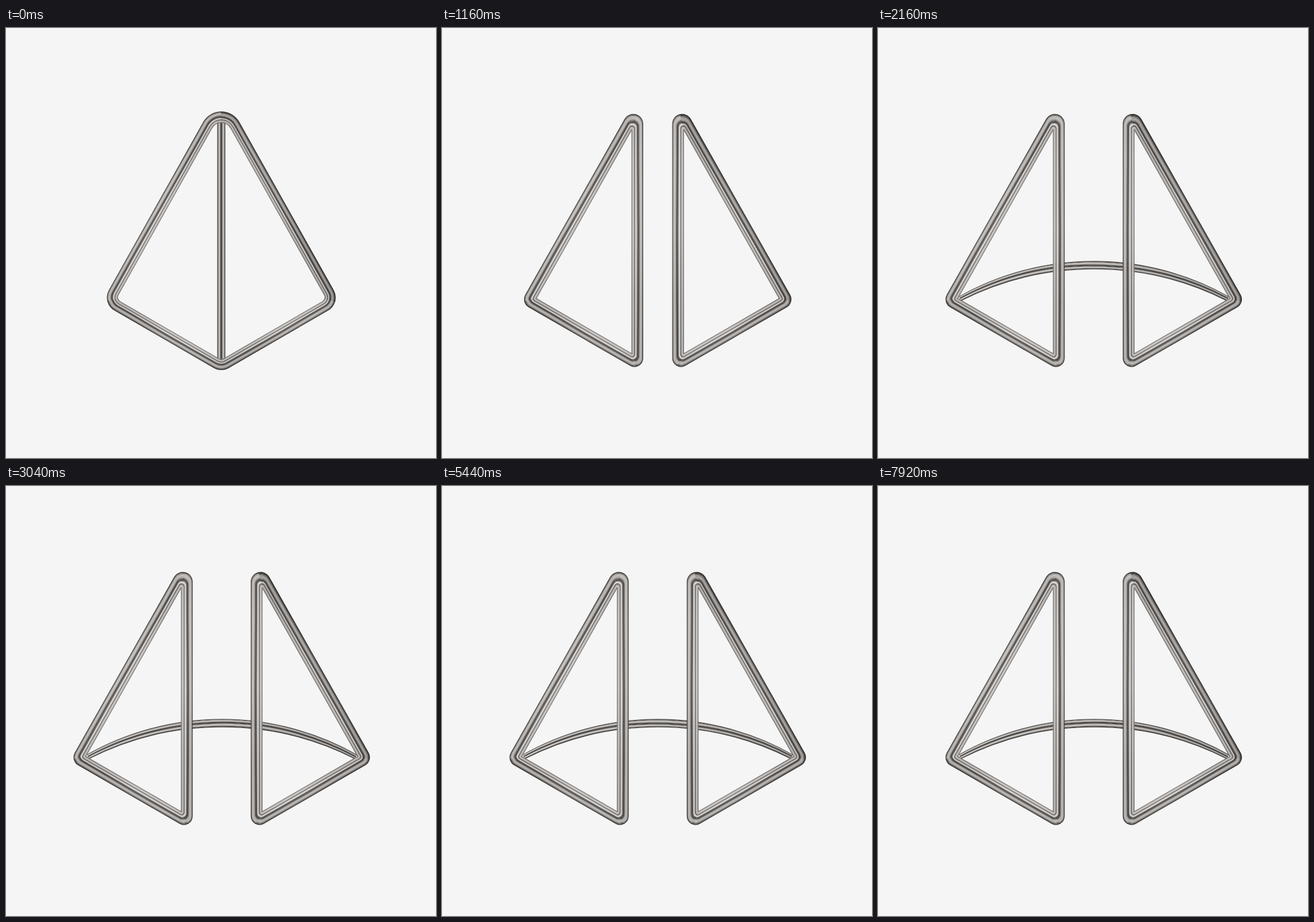
Recreate the animation shown at these times as an HTML page. Size 748x748 px, loop 7960 ms.

```html
<!DOCTYPE html>
<html lang="en">
<head>
<meta charset="utf-8">
<title>Steel frame</title>
<style>
  html, body { margin: 0; width: 100%; height: 100%; overflow: hidden; background: #f5f5f5; }
  svg { display: block; width: 100vw; height: 100vh; }
</style>
</head>
<body>
<svg id="stage" viewBox="0 0 748 748"></svg>
<script>
const LOOP = 7960, STEP = 40, SPLIT = 760, OPEN = 800, ARC_START = 1720;
const NS = 'http://www.w3.org/2000/svg';
const stage = document.getElementById('stage');
let nextId = 0;

function add(parent, tag, attrs = {}) {
  const el = document.createElementNS(NS, tag);
  for (const key in attrs) el.setAttribute(key, attrs[key]);
  return parent.appendChild(el);
}

const defs = add(stage, 'defs');
const range = n => Array.from({ length: n }, (_, i) => i);
const bump = (u, at, width) => Math.exp(-(((u - at) / width) ** 2));

function steel(grey) {
  const g = Math.min(232, Math.max(28, grey));
  return `rgb(${Math.round(g + 1)},${Math.round(g - 2)},${Math.round(g - 5)})`;
}

// Grey across a tube: u runs from the outer edge (0) to the inner edge (1)
function tubeTone(u, { rim, band, light }) {
  return light
    - 120 * bump(u, 0, rim)
    + 22 * bump(u, band - 0.24, 0.14)
    - 105 * bump(u, band, 0.1)
    + 75 * bump(u, 0.64, 0.05)
    - 75 * bump(u, 0.74, 0.045)
    + 25 * bump(u, 0.87, 0.07)
    - 70 * bump(u, 1, 0.04);
}

// Two thin rods side by side
const rodTone = (u, turn = 0) => 132 + 74 * Math.cos(4 * Math.PI * (u - 0.25) + turn);

function gradient(p, q, greys) {
  const id = 'g' + nextId++;
  const el = add(defs, 'linearGradient', {
    id, gradientUnits: 'userSpaceOnUse', x1: p[0], y1: p[1], x2: q[0], y2: q[1]
  });
  const stops = greys.map((g, i) => add(el, 'stop', {
    offset: i / (greys.length - 1), 'stop-color': steel(g)
  }));
  return { url: `url(#${id})`, stops };
}

const along = (p, dir, len) => [p[0] + dir[0] * len, p[1] + dir[1] * len];
const xy = p => p.map(n => n.toFixed(2)).join(' ');

function unit(x, y) {
  const len = Math.hypot(x, y);
  return [x / len, y / len];
}

// Rounded corner data for every vertex of a polygon moved inwards by d
function corners(points, radius, d) {
  const n = points.length;
  return points.map((p, i) => {
    const a = points[(i + n - 1) % n], b = points[(i + 1) % n];
    const u = unit(a[0] - p[0], a[1] - p[1]), v = unit(b[0] - p[0], b[1] - p[1]);
    const half = Math.acos(u[0] * v[0] + u[1] * v[1]) / 2;
    const bis = unit(u[0] + v[0], u[1] + v[1]);
    const tip = along(p, bis, d / Math.sin(half));
    const r = radius(i, d), cut = r / Math.tan(half);
    return {
      r,
      from: along(tip, u, cut),
      to: along(tip, v, cut),
      mid: along(tip, bis, r / Math.sin(half) - r)
    };
  });
}

// A closed tube made of thin nested outlines; its dark band drifts along each side
function tube(parent, points, radius, width, sides) {
  const levels = 24;
  for (const k of range(levels)) {
    const u = (k + 0.5) / levels;
    const c = corners(points, radius, u * width);
    sides.forEach((side, i) => {
      const j = (i + 1) % points.length, p = c[i], q = c[j];
      const greys = range(5).map(s => tubeTone(u, {
        ...side,
        band: side.band + 0.03 * Math.sin(s * 1.6 + i),
        light: side.light + 10 * Math.sin(s * 1.5 - 2)
      }));
      add(parent, 'path', {
        d: `M${xy(p.mid)}A${p.r} ${p.r} 0 0 0 ${xy(p.to)}L${xy(q.from)}A${q.r} ${q.r} 0 0 0 ${xy(q.mid)}`,
        fill: 'none',
        stroke: gradient(points[i], points[j], greys).url,
        'stroke-width': width / levels + 0.5,
        'stroke-linecap': 'square'
      });
    });
  }
}

const slantLight = { rim: 0.1, band: 0.46, light: 172 };
const slantDark = { rim: 0.2, band: 0.5, light: 162 };
const base = { rim: 0.16, band: 0.48, light: 172 };
const post = { rim: 0.09, band: 0.44, light: 170 };

// Rod behind the two frames
const arc = add(stage, 'g');
const ARC_LEVELS = 16, ARC_STOPS = 12;
const arcBands = range(ARC_LEVELS).map(k => {
  const u = (k + 0.5) / ARC_LEVELS;
  const r = 476 + 37 * u, top = 405.5 + 14 * u, reach = 235 - 4 * u;
  const y = top + r - Math.sqrt(r * r - reach * reach);
  const paint = gradient([141, 0], [611, 0], range(ARC_STOPS));
  add(arc, 'path', {
    d: `M${375.5 - reach} ${y}A${r} ${r} 0 0 1 ${375.5 + reach} ${y}`,
    fill: 'none', stroke: paint.url, 'stroke-width': 1.25
  });
  return { u, stops: paint.stops };
});

// Two separate triangles
const triangle = [[324.5, 102], [112, 477.8], [324.5, 600.4]];
const triRadius = (i, d) => (17 - i) * (1 - d / 20);
const left = add(stage, 'g');
const right = add(stage, 'g');
tube(left, triangle, triRadius, 20, [slantLight, base, post]);
tube(right, triangle, triRadius, 20, [slantDark, base, post]);

// Closed kite with its middle bar
const kite = add(stage, 'g');
const bar = gradient([367.5, 0], [381.5, 0], range(13).map(i => rodTone(i / 12)));
add(kite, 'rect', { x: 367.5, y: 160, width: 14, height: 419, fill: bar.url });
tube(kite, [[374.5, 108], [166.5, 478.4], [374.5, 598.8], [582.5, 478.4]],
  (i, d) => (i ? 26 : 36) - d * 0.95, 18.5,
  [slantLight, base, base, slantDark]);

const show = (el, on) => el.setAttribute('visibility', on ? 'visible' : 'hidden');

// Reflections slide round and along the rod
function shadeArc(t) {
  const phase = t / 1600 * 2 * Math.PI;
  for (const { u, stops } of arcBands) {
    const loose = Math.sin(Math.PI * u);
    stops.forEach((stop, i) => {
      const x = i / (ARC_STOPS - 1);
      const turn = loose * (0.6 * Math.sin(5 * x + phase) + 0.3 * Math.sin(11 * x - phase));
      stop.setAttribute('stop-color', steel(rodTone(u, turn) * (1.05 - 0.15 * x)));
    });
  }
}

function draw(time) {
  const t = Math.floor(time % LOOP / STEP) * STEP;
  const open = t >= SPLIT;
  show(kite, !open);
  show(left, open);
  show(right, open);
  show(arc, t >= ARC_START);
  const p = Math.min(1, Math.max(0, (t - SPLIT) / OPEN));
  const offset = 50.5 * (1 + Math.cos(Math.PI * p)) / 2;
  left.setAttribute('transform', `translate(${offset} 0)`);
  right.setAttribute('transform', `translate(${750.5 - offset} 0) scale(-1 1)`);
  if (t >= ARC_START) shadeArc(t - ARC_START);
}

const start = performance.now();
function tick() {
  draw(performance.now() - start);
  requestAnimationFrame(tick);
}
tick();
</script>
</body>
</html>
```
